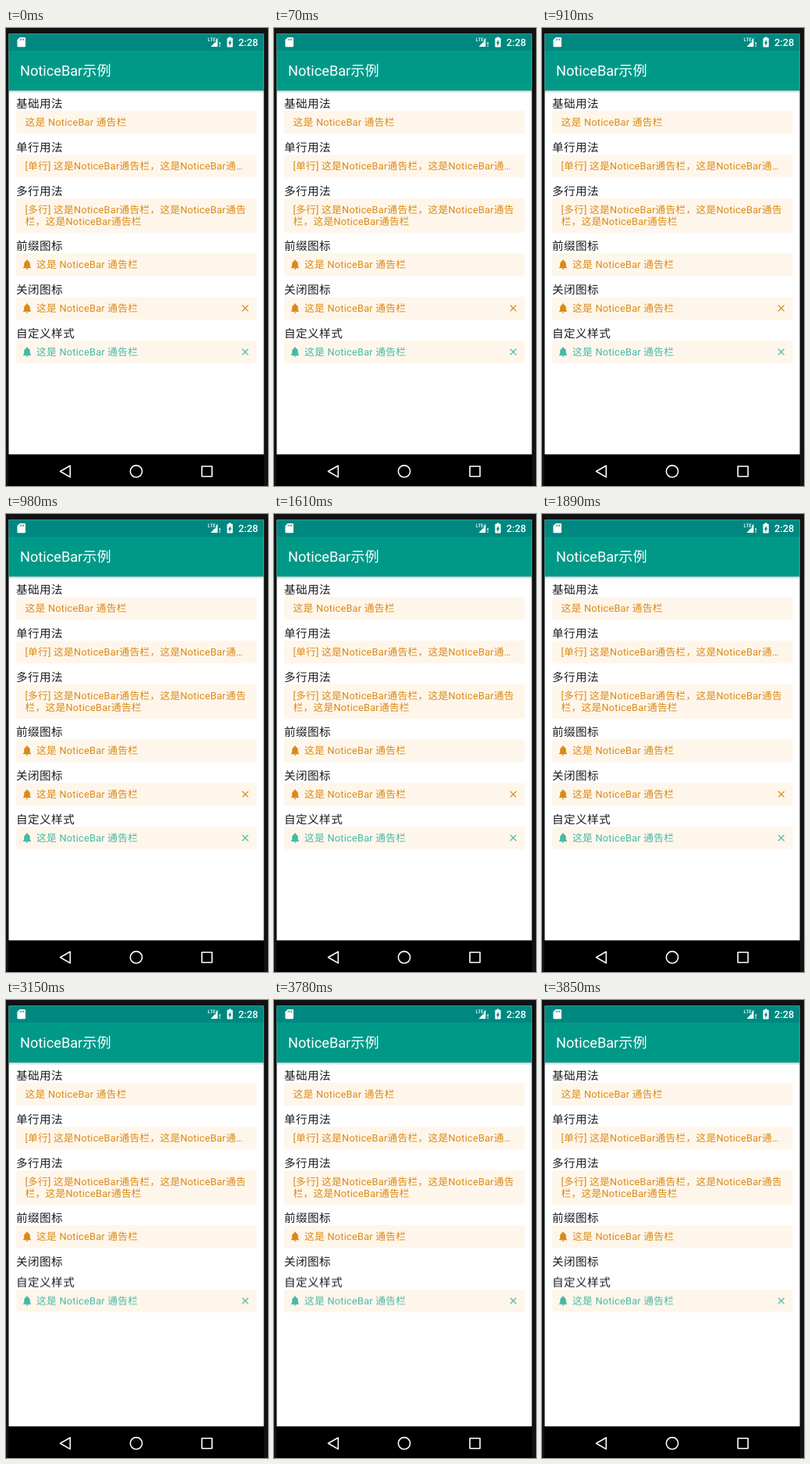
An HTML page that plays this animation: 336x586 px, repeating every 4550 ms.

```html
<!DOCTYPE html>
<html lang="zh-CN">
<head>
<meta charset="utf-8">
<title>NoticeBar示例</title>
<style>
html, body { margin: 0; width: 100%; height: 100%; overflow: hidden; background: #111213; }
svg { display: block; width: 336px; height: 586px; }
text { font-family: Roboto, "Noto Sans CJK SC", "Noto Sans CJK", sans-serif; white-space: pre; text-rendering: geometricPrecision; }
.title { font-size: 18.2px; fill: #fff; }
.head { font-size: 14.58px; letter-spacing: .456px; fill: #1c1c1c; }
.note { font-size: 12.76px; letter-spacing: .24px; }
.clock { font-size: 12.8px; font-weight: 500; fill: #fff; }
.lte { font-size: 6.2px; font-weight: 500; fill: #fff; }
</style>
</head>
<body>
<svg viewBox="0 0 336 586">
  <defs>
    <linearGradient id="shade" x1="0" y1="0" x2="0" y2="1">
      <stop offset="0" stop-color="#000" stop-opacity=".22"/>
      <stop offset="1" stop-color="#000" stop-opacity="0"/>
    </linearGradient>
    <path id="bell" d="M12 22c1.1 0 2-.9 2-2h-4c0 1.1.89 2 2 2zm6-6v-5c0-3.07-1.64-5.64-4.5-6.32V4c0-.83-.67-1.5-1.5-1.5s-1.5.67-1.5 1.5v.68C7.63 5.36 6 7.92 6 11v5l-2 2v1h16v-1l-2-2z"/>
    <path id="cross" d="M19 6.41 17.59 5 12 10.59 6.41 5 5 6.41 10.59 12 5 17.59 6.41 19 12 13.41 17.59 19 19 17.59 13.41 12z"/>
  </defs>

  <rect x="3.5" y="7.4" width="327.1" height="538.6" fill="#fff"/>
  <rect x="3.5" y="7.4" width="327.1" height="21.6" fill="#008880"/>
  <rect x="3.5" y="29" width="327.1" height="51" fill="#009988"/>
  <rect x="3.5" y="80" width="327.1" height="3.5" fill="url(#shade)"/>
  <text class="title" x="18" y="60.5">NoticeBar示例</text>

  <!-- status icons -->
  <path fill="#fff" d="M17.6 12h6.2q1.2 0 1.2 1.2v9.9q0 1.2-1.2 1.2h-8.2q-1.2 0-1.2-1.2v-7.9z"/>
  <path stroke="#008880" stroke-width="1" d="M18.3 13.6v2.2M20.4 13.6v2.2M22.5 13.6v2.2"/>
  <text class="lte" x="258.8" y="16.6">LTE</text>
  <path fill="#fff" d="M271.4 12.6V24h-8.8l5-5.4h1.6v-3.4zM273.6 18h1.2v3.4h-1.2zM273.6 22.6h1.2V24h-1.2z"/>
  <path fill="#fff" transform="translate(278.4 10.2) scale(.73 .65)" d="M15.67 4H14V2h-4v2H8.33C7.6 4 7 4.6 7 5.33v15.33C7 21.4 7.6 22 8.33 22h7.33c.74 0 1.34-.6 1.34-1.33V5.33C17 4.6 16.4 4 15.67 4zM11 20v-5.5H9L13 7v5.5h2L11 20z"/>
  <text class="clock" x="298" y="22.6">2:28</text>

  <g id="list"></g>

  <!-- navigation -->
  <rect x="3" y="545.5" width="328" height="40.5" fill="#000"/>
  <g fill="none" stroke="#fff" stroke-width="1.6" stroke-linejoin="round">
    <path d="M69.5 567.3 82.3 560v14.6z"/>
    <circle cx="167" cy="567.2" r="7.6"/>
    <rect x="251.2" y="560.8" width="13" height="13"/>
  </g>
</svg>
<script>
const LOOP = 4550, CLOSE_AT = 3150, SHIFT = -29.6;
const AMBER = '#da8a16', TEAL = '#46b8a8';
const MSG = '这是 NoticeBar 通告栏';

// heading, heading centre, text lines, colour, bell, cross
const sections = [
  ['基础用法', 97, [MSG], AMBER],
  ['单行用法', 153, ['[单行] 这是NoticeBar通告栏，这是NoticeBar通…'], AMBER],
  ['多行用法', 209, ['[多行] 这是NoticeBar通告栏，这是NoticeBar通告', '栏，这是NoticeBar通告栏'], AMBER],
  ['前缀图标', 279.3, [MSG], AMBER, true],
  ['关闭图标', 335.2, [MSG], AMBER, true, true],
  ['自定义样式', 391, [MSG], TEAL, true, true]
];

const text = (cls, x, y, s, fill = '') =>
  `<text class="${cls}" x="${x}" y="${y}"${fill && ` fill="${fill}"`}>${s}</text>`;
const icon = (id, cx, cy, size, fill) =>
  `<use href="#${id}" fill="${fill}" transform="translate(${cx - size / 2} ${cy - size / 2}) scale(${size / 24})"/>`;

function section([head, y, lines, color, bell, cross], i) {
  const mid = y + 23.4;
  const height = 29.2 + (lines.length - 1) * 14.8;
  return `<g id="s${i}">${text('head', 13, y + 5.1, head)}<g class="bar">
    <rect x="13" y="${y + 9}" width="308.4" height="${height}" fill="#fff6eb"/>
    ${bell ? icon('bell', 27, mid, 15.4, color) : ''}
    ${lines.map((s, n) => text('note', bell ? 39.1 : 24.5, mid + 4.7 + n * 14.8, s, color)).join('')}
    ${cross ? icon('cross', 306.8, mid, 14.6, color) : ''}</g></g>`;
}

document.getElementById('list').innerHTML = sections.map(section).join('');

function switchAt(selector, before, after) {
  const offset = CLOSE_AT / LOOP;
  document.querySelector(selector).animate(
    [{ ...before, offset: 0 }, { ...before, offset }, { ...after, offset }, { ...after, offset: 1 }],
    { duration: LOOP, iterations: Infinity });
}

switchAt('#s4 .bar', { opacity: 1 }, { opacity: 0 });
switchAt('#s5', { transform: 'translateY(0px)' }, { transform: `translateY(${SHIFT}px)` });
</script>
</body>
</html>
```
